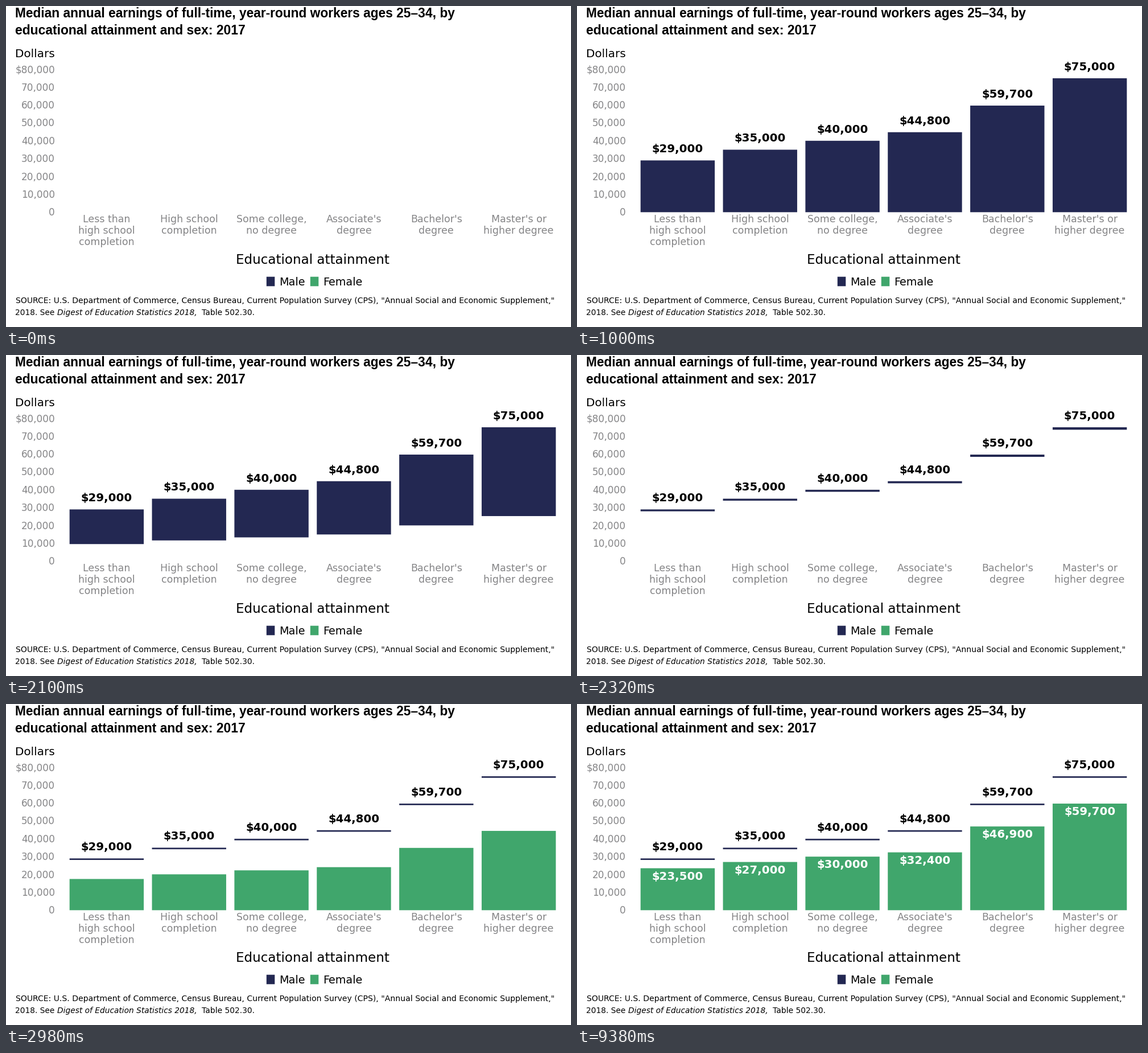
These frames come from a looping animation (993 px wide and 564 px high, 9.4 s). A matplotlib script:

```python
import matplotlib.pyplot as plt
from matplotlib.animation import FuncAnimation
from matplotlib.patches import Rectangle

W, H, DPI = 993, 564, 64
STEP, LOOP = 20, 9400
NAVY, GREEN, GRAY = "#232852", "#40a66c", "#848486"
BASE, SCALE = 362.3, 3.1375 / 1000
BAR_X, PITCH, BAR_W, LINE_H = 111.7, 144.85, 130.4, 2.7

MALE = [29000, 35000, 40000, 44800, 59700, 75000]
FEMALE = [23500, 27000, 30000, 32400, 46900, 59700]
LEVELS = [
    "Less than\nhigh school\ncompletion",
    "High school\ncompletion",
    "Some college,\nno degree",
    "Associate's\ndegree",
    "Bachelor's\ndegree",
    "Master's or\nhigher degree",
]

plt.rcParams["font.family"] = "DejaVu Sans"
fig = plt.figure(figsize=(W / DPI, H / DPI), dpi=DPI, facecolor="white")
ax = fig.add_axes([0, 0, 1, 1])
ax.set_xlim(0, W)
ax.set_ylim(H, 0)
ax.axis("off")


def write(x, y, text, px, color="black", ha="left", **style):
    """Text on baseline y with its size in pixels."""
    return ax.text(x, y, text, fontsize=px * 72 / DPI, color=color,
                   ha=ha, va="baseline", **style)


def box(x, y, w, h, color):
    return ax.add_patch(Rectangle((x, y), w, h, facecolor=color, lw=0, snap=False))


def ease(t, start, length):
    """Cubic ease in and out, clamped to 0..1."""
    u = min(max((t - start) / length, 0), 1)
    return 4 * u ** 3 if u < 0.5 else 1 - 4 * (1 - u) ** 3


def heading():
    style = dict(family="Liberation Sans", weight="bold")
    write(16.5, 20, "Median annual earnings of full-time, year-round workers "
          "ages 25–34, by", 22.8, **style)
    write(16.5, 50.3, "educational attainment and sex: 2017", 22.9, **style)


def axes_text():
    write(16, 90.3, "Dollars", 20)
    for k in range(9):
        label = f"{k * 10000:,}" if k < 8 else "$80,000"
        write(86, BASE + 6 - k * 10000 * SCALE, label, 16.9, GRAY, "right")
    for i, level in enumerate(LEVELS):
        for row, line in enumerate(level.split("\n")):
            write(BAR_X + PITCH * i + BAR_W / 2, 380.3 + 19.7 * row, line,
                  17.4, GRAY, "center")
    write(538.5, 452.8, "Educational attainment", 23, ha="center")


def legend():
    for x, color, name in ((457.8, NAVY, "Male"), (534.8, GREEN, "Female")):
        box(x, 475.7, 14.5, 16.6, color)
        write(x + 22.4, 491, name, 19.3)


def source_note():
    write(16.8, 522.3, "SOURCE: U.S. Department of Commerce, Census Bureau, "
          "Current Population Survey (CPS), \"Annual Social and Economic "
          "Supplement,\"", 14.05)
    write(16, 542.6, "2018. See", 13.8)
    write(89.5, 542.6, "Digest of Education Statistics 2018,", 13.75, style="italic")
    write(343.5, 542.6, "Table 502.30.", 13.9)


def series(values, color, text_color, dy):
    """Bars of zero height plus hidden value labels."""
    bars, labels = [], []
    for i, value in enumerate(values):
        x = BAR_X + PITCH * i
        bars.append(box(x, BASE, BAR_W, 0, color))
        labels.append(write(x + BAR_W / 2, BASE - value * SCALE + dy, f"${value:,}",
                            19.8, text_color, "center", weight="bold"))
    return bars, labels


heading()
axes_text()
legend()
source_note()
male_bars, male_labels = series(MALE, NAVY, "black", -14)
female_bars, female_labels = series(FEMALE, GREEN, "white", 20)


def update(frame):
    t = frame * STEP
    grow = ease(t, 0, 1000)
    shrink = ease(t, 1880, 500) if t >= 1960 else 0
    rise = ease(t, 2380, 1000)

    for bar, value in zip(male_bars, MALE):
        full = value * SCALE
        bar.set_y(BASE - full * grow)
        bar.set_height(full * grow - (full - LINE_H) * shrink)
    for bar, value in zip(female_bars, FEMALE):
        bar.set_y(BASE - value * SCALE * rise)
        bar.set_height(value * SCALE * rise)
    for label in male_labels:
        label.set_visible(t >= 1000)
    for label in female_labels:
        label.set_visible(t >= 3380)
    return male_bars + female_bars + male_labels + female_labels


anim = FuncAnimation(fig, update, frames=LOOP // STEP, interval=STEP,
                     repeat=True, repeat_delay=0, blit=False)
plt.show()
```
